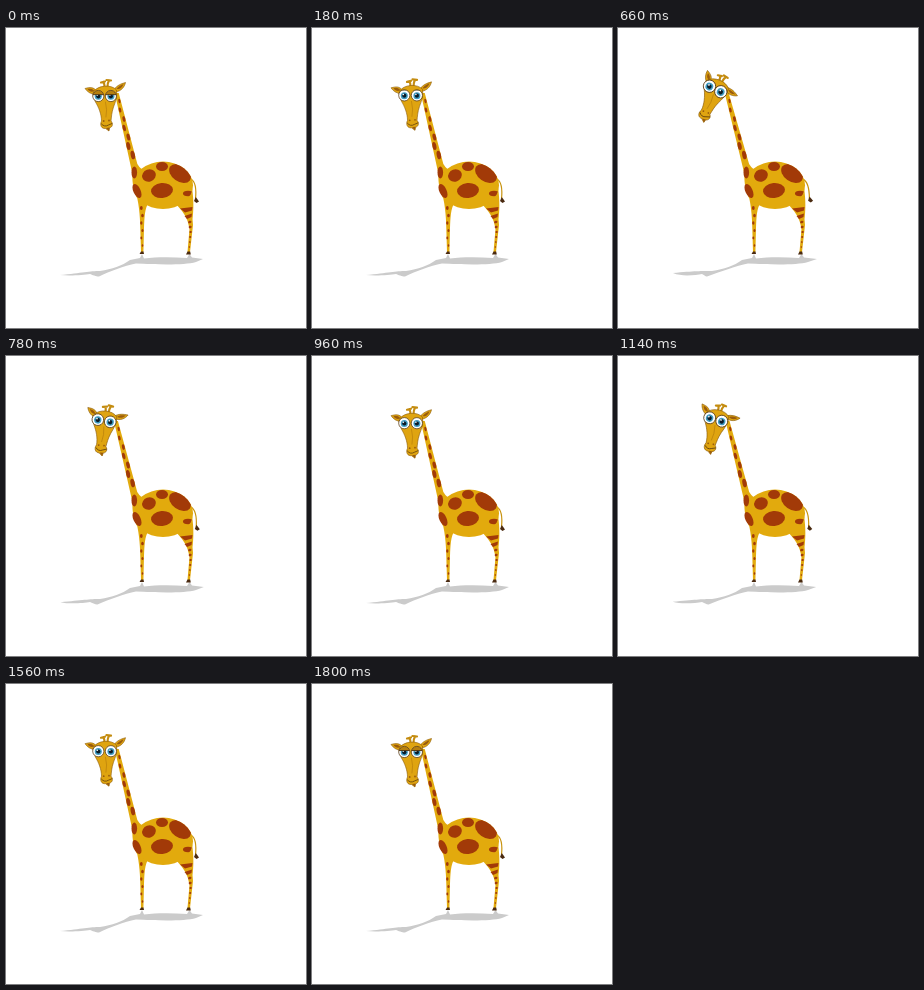
Recreate the animation shown at these times as an HTML page. Size 300 by 300 pixels, loop 1.92 s.

```html
<!DOCTYPE html>
<html lang="en">
<head>
<meta charset="utf-8">
<title>Giraffe</title>
<style>
  html, body { margin: 0; width: 100%; height: 100%; overflow: hidden; background: #fff; }
  svg { display: block; width: 100%; height: 100%; }
  .spot { fill: #a23a08; }
  .hoof { fill: #4a2a10; }
  .coat { fill: #e2aa0d; }
  .skin { fill: #dfa410; stroke: #8a5a0a; stroke-width: .6; stroke-linejoin: round; }
  .inner { fill: #9a5c0d; }
  .line { fill: none; stroke: #4d300c; stroke-linecap: round; stroke-linejoin: round; }
</style>
</head>
<body>
<svg viewBox="0 0 300 300">
  <defs>
    <clipPath id="trunk"><ellipse cx="157" cy="157.300" rx="30" ry="23.700"/></clipPath>
    <clipPath id="ball"><circle r="5.600"/></clipPath>
    <g id="eye">
      <circle r="5.600" fill="#fff"/>
      <circle cy=".3" r="3.500" fill="#3f9cc4"/>
      <circle cy=".3" r="2.100" fill="#0b1c28"/>
      <circle cx="-1" cy="-.9" r=".8" fill="#fff"/>
      <g clip-path="url(#ball)">
        <rect id="lid" x="-7" width="14" height="12" fill="#b67f0e" stroke="#4d300c" stroke-width=".9"/>
      </g>
      <circle r="5.600" fill="none" stroke="#4d300c" stroke-width=".7"/>
    </g>
  </defs>

  <path id="shadow" fill="#cbcbcb"/>

  <g id="tail">
    <path class="line" d="M185 151C190 154 190.500 161 189.500 171" stroke="#c8930f" stroke-width="1.200" style="stroke:#c8930f"/>
    <path class="hoof" d="M189.800 169L188 173L190.500 175L193 173.500Z"/>
  </g>

  <!-- legs -->
  <path class="coat" d="M170 176L186 160C188 172 187.500 184 186.500 191L187 197L184 224H181.500L183.500 201C182 193 181 188 170 176Z"/>
  <path class="coat" d="M129 161L143 174C138.500 180 138.500 190 138 200L137.400 224H135L134.300 200C134 187 133 175 129 161Z"/>
  <path class="hoof" d="M135 223.500H137.500L138 226H133.500ZM181.500 223.500H184.200L184.800 226.500H180Z"/>
  <g id="legSpots" class="spot"></g>

  <ellipse class="coat" cx="157" cy="157.300" rx="30" ry="23.700"/>
  <path id="neck" class="coat"/>
  <g id="neckSpots" class="spot"></g>
  <g class="spot" clip-path="url(#trunk)">
    <ellipse cx="156" cy="138.500" rx="6" ry="4.500"/>
    <ellipse cx="143" cy="147.500" rx="7" ry="6" transform="rotate(-20 143 147.500)"/>
    <ellipse cx="174" cy="145.500" rx="12" ry="8" transform="rotate(35 174 145.500)"/>
    <ellipse cx="156" cy="162.500" rx="11" ry="7.500" transform="rotate(-5 156 162.500)"/>
    <ellipse cx="182" cy="165.500" rx="5" ry="2.800"/>
  </g>
  <g class="spot">
    <ellipse cx="131" cy="163" rx="3.600" ry="7.500" transform="rotate(-25 131 163)"/>
    <ellipse cx="128.300" cy="144.500" rx="2.800" ry="6"/>
    <path d="M174 180.500L186.500 179L186 182.500L179 184.500ZM178.500 188L186 185.500L185.500 189L181 191Z"/>
  </g>

  <!-- head, with the origin between the eyes -->
  <g id="head">
    <g id="earR">
      <path class="skin" d="M9 -6C13 -11 16 -12 21 -13.500C20 -9 17 -5 11 -4Z"/>
      <path class="inner" d="M12 -7C14 -10 16 -10.500 19 -12C18 -9 16 -6.500 12 -7Z"/>
    </g>
    <g id="earL">
      <path class="skin" d="M-8 -5C-11 -9 -14 -9 -19.500 -7.500C-17 -4 -14 -2 -9 -1.500Z"/>
      <path class="inner" d="M-10 -5C-12 -7.500 -14 -7.500 -17 -7C-15 -4.500 -13 -3.500 -10 -5Z"/>
    </g>
    <g class="line" style="stroke:#c48c10" stroke-width="2.200">
      <path d="M0 -9Q0 -12 -1 -14M3 -9Q3 -13 4.500 -15.500M-3.500 -13.500L.5 -14.500M2 -16L6.500 -15.500"/>
    </g>
    <path class="skin" d="M-11 -4C-7 -11 7 -12 12 -6C13 0 11 6 9 11C7 17 7 21 6.500 25C9 28 8 31 5 32L4.500 35L1 32.500C-3 33 -5 29 -3 25C-3 18 -6 11 -9 6C-11 2 -12 -1 -11 -4Z"/>
    <path class="line" d="M1 6Q3 14 1.500 21" stroke-width=".6" style="stroke:#b37a0b"/>
    <path class="line" d="M-3 28Q0 31.500 4 29L7.500 27.500" stroke-width=".7"/>
    <path class="inner" d="M1.500 32L5 31.500L4.500 35Z"/>
    <circle class="inner" cx="-.8" cy="25" r=".9"/>
    <circle class="inner" cx="4.500" cy="24.500" r=".9"/>
    <use class="eye" href="#eye" x="0"/>
    <use class="eye" href="#eye" x="0"/>
  </g>
</svg>

<script>
const $ = id => document.getElementById(id);
const LOOP = 1920, STEP = 60;
const NECK_TOP = 65, NECK_END = 146;

const set = (id, name, value) => $(id).setAttribute(name, value);
const ease = p => p * p * (3 - 2 * p);
const ramp = (t, from, to) => ease(Math.min(1, Math.max(0, (t - from) / (to - from))));
const hump = (t, peak, reach) => ramp(t, peak - reach, peak) - ramp(t, peak, peak + reach);
const oval = (x, y, rx, ry, tilt) =>
  `<ellipse cx="${x}" cy="${y}" rx="${rx}" ry="${ry}" transform="rotate(${tilt} ${x} ${y})"/>`;
const repeat = (n, part) => Array.from({ length: n }, (_, i) => part(i)).join('');

// Small marks down both legs
$('legSpots').innerHTML = repeat(6, i => {
  const y = 180 + i * 7.5, side = i % 2 ? .5 : -.7;
  return oval(136 + side, y, 1.4 - i * .12, 2 - i * .15, 0) +
    oval(184.6 - Math.abs(i - 2) * .4, 194 + i * 5, 1.7 - i * .2, 1.3 - i * .12, -15);
});

function drawNeck(bend) {
  const mid = y => 111 + .24 * (y - 66) + bend * (NECK_END - y) / (NECK_END - NECK_TOP);
  const half = y => 2 + .022 * (y - 66);
  const left = y => `${mid(y) - half(y)} ${y}`;
  const right = y => `${mid(y) + half(y)} ${y}`;
  set('neck', 'd', `M${left(NECK_TOP)}L${left(NECK_END)}C126 156 128 163 131 170
    L145 146Q135 143 ${right(136)}L${right(NECK_TOP)}Z`);
  $('neckSpots').innerHTML = repeat(7, i => {
    const y = 73 + i * 9, side = i % 2 ? -.35 : .35;
    return oval(mid(y) + side * half(y), y, 1.1 + i * .17, 2.2 + i * .36, -12);
  });
}

function drawShadow(k) {
  set('shadow', 'd', `M134 230L124 232C116 238 106 241 94 243
    C84 243 76 ${245 - 2 * k} ${54 + k} ${247 - 2 * k}
    C64 ${248 + k} 78 247 84 246C86 247 ${92 - 4 * k} 249 ${93 - 4 * k} 248.500
    C104 243 118 238 130 235.500C150 236.500 178 237.500 190 234L${197 + 2 * k} 231
    L186 229.500L183.500 226L181 230C165 229 150 229 138 230.500L136 226Z`);
}

function draw(t) {
  const awake = ramp(t, 30, 240) - ramp(t, 1560, 1820);
  const turn = 26 * hump(t, 660, 210) + 18 * hump(t, 1110, 150)
    - 15 * hump(t, 360, 150) - 21 * hump(t, 1320, 200);
  const lift = Math.max(0, turn), tilt = Math.abs(turn);

  set('head', 'transform',
    `translate(${98.5 - lift * .055} ${68 - lift * .24 - awake * .8}) rotate(${turn})`);
  set('earL', 'transform', `rotate(${tilt * 1.5} -9 -4)`);
  set('earR', 'transform', `rotate(${tilt * 1.7} 10 -6)`);
  set('tail', 'transform', `rotate(${-turn * .22} 186 152)`);
  set('lid', 'y', -13.3 - 5.2 * awake);
  document.querySelectorAll('.eye').forEach((eye, i) =>
    eye.setAttribute('transform', `translate(${i ? 6.4 : -6.2} 0) scale(${1 + tilt * .004})`));
  drawNeck(-turn * .08);
  drawShadow(turn / 26);
}

// The motion is held in steps, as in drawn animation.
const start = performance.now();
let shown = -1;
function tick() {
  const t = Math.floor((performance.now() - start) % LOOP / STEP) * STEP;
  if (t !== shown) draw(shown = t);
  requestAnimationFrame(tick);
}
tick();
</script>
</body>
</html>
```
